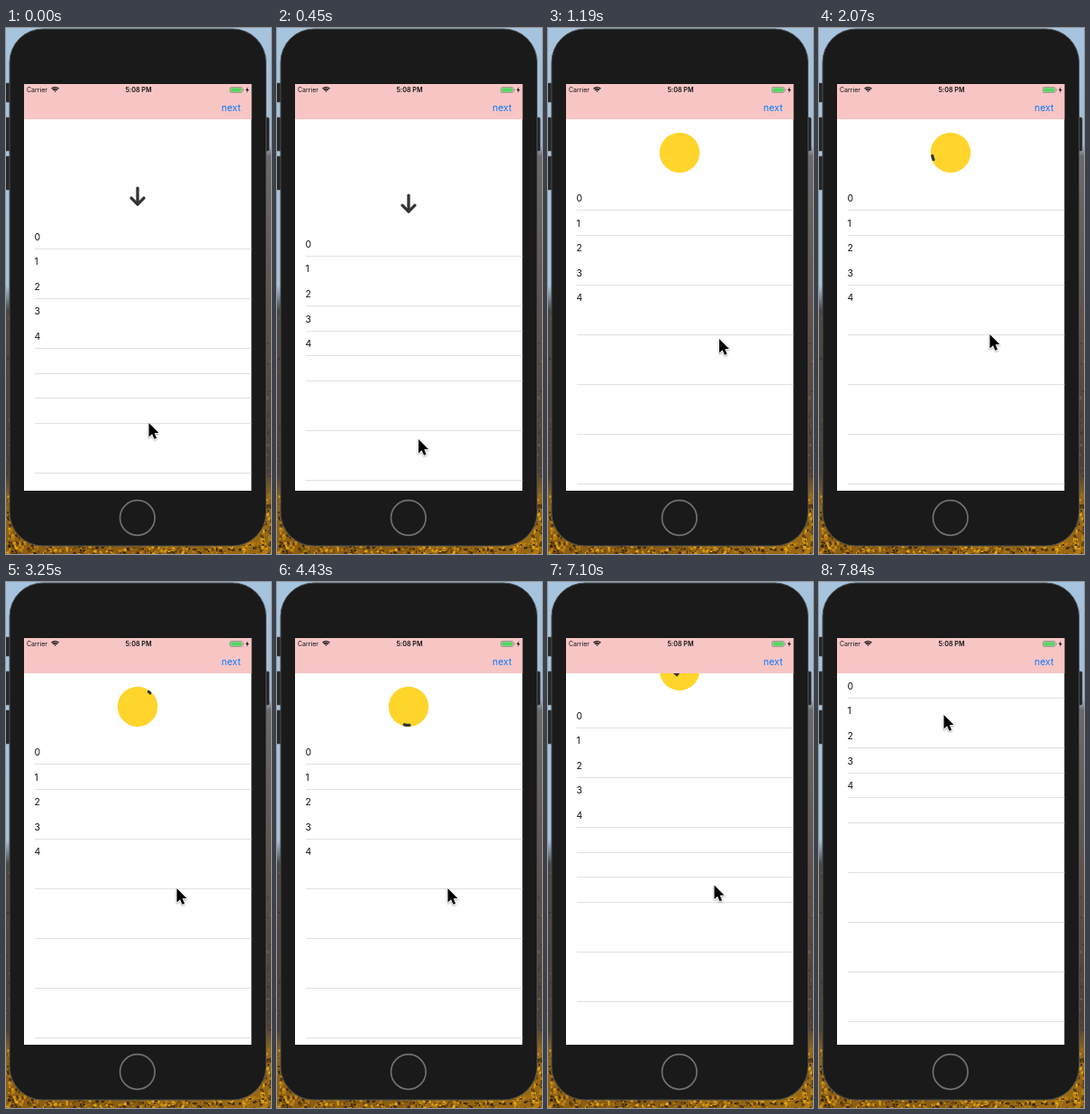
Animation of 294 by 582 pixels, one loop 7990 ms. Source, as an HTML page with a canvas:

```html
<!DOCTYPE html>
<html lang="en">
<head>
<meta charset="utf-8">
<title>Pull to refresh</title>
<style>
  html, body { margin: 0; width: 100%; height: 100%; overflow: hidden; background: #1b1b1b; }
  canvas { display: block; width: 294px; height: 582px; }
</style>
</head>
<body>
<canvas></canvas>
<script>
const W = 294, H = 582, LOOP = 7990, TAU = Math.PI * 2;
const SCREEN = { x: 20, y: 62, w: 252.5, h: 450 }, NAV_BOTTOM = 101;
const ROW = 27.54, LINE = 0.62;
const INK = '#333436', FONT = 'Inter, Roboto, sans-serif';

// Screen updates come every 150 ms, a few of them after 140 ms.
const SHORT = new Set([7, 10, 13, 18, 21, 24, 28, 32, 37, 43, 48]);
const starts = [0];
for (let i = 0; i < 53; i++) starts.push(starts[i] + (SHORT.has(i) ? 140 : 150));

// [time, y of the first separator]
const SCROLL = [[0, 244.22], [600, 255], [750, 228.3], [900, 208], [1040, 202.4], [1190, 201.46],
  [6950, 201.46], [7100, 161.22], [7240, 139], [7390, 131], [7540, 128.3]];
// [time, x, y]
const POINTER = [[0, 158.5, 437], [600, 156.5, 461], [750, 156.5, 461], [1190, 190, 344],
  [1340, 189.5, 339], [6950, 189.5, 339], [7100, 184.5, 335.5], [7390, 165, 260],
  [7690, 140, 158], [7840, 138.5, 147]];

const canvas = document.querySelector('canvas');
const scale = window.devicePixelRatio || 1;
canvas.width = W * scale;
canvas.height = H * scale;
const backdrop = document.createElement('canvas');
backdrop.width = canvas.width;
backdrop.height = canvas.height;
let c;

function at(keys, t) {
  const i = keys.findIndex(k => k[0] > t);
  if (i < 0) return keys[keys.length - 1].slice(1);
  const a = keys[i - 1], b = keys[i], p = (t - a[0]) / (b[0] - a[0]);
  return a.slice(1).map((v, n) => v + (b[n + 1] - v) * p);
}

function rect(x, y, w, h, fill) {
  c.fillStyle = fill;
  c.fillRect(x, y, w, h);
}

function rounded(x, y, w, h, r, fill, stroke, width = 1) {
  c.beginPath();
  c.roundRect(x, y, w, h, r);
  if (fill) { c.fillStyle = fill; c.fill(); }
  if (stroke) { c.strokeStyle = stroke; c.lineWidth = width; c.stroke(); }
}

function line(points, color, width) {
  c.beginPath();
  points.forEach(p => c.lineTo(...p));
  c.strokeStyle = color;
  c.lineWidth = width;
  c.lineCap = c.lineJoin = 'round';
  c.stroke();
}

function label(text, x, y, size, color = '#111', weight = 400, align = 'left') {
  c.font = `${weight} ${size}px ${FONT}`;
  c.textAlign = align;
  c.fillStyle = color;
  c.fillText(text, x, y);
}

function gradient(stops) {
  const g = c.createLinearGradient(0, 0, 0, H);
  stops.forEach(([y, color]) => g.addColorStop(y / H, color));
  return g;
}

function drawWallpaper() {
  let seed = 7;
  const rnd = () => (seed = seed * 16807 % 2147483647) / 2147483647;
  rect(0, 0, 150, H, gradient([[0, '#a6c4de'], [285, '#a9c3d8'], [300, '#77828c'], [312, '#4b4845'],
    [495, '#4a4038'], [520, '#8a6420'], [582, '#8c5d12']]));
  rect(150, 0, 144, H, gradient([[0, '#a6c4de'], [130, '#a3bcd2'], [142, '#6d6a6c'], [330, '#5d514b'],
    [490, '#4b4038'], [520, '#94691c'], [582, '#996812']]));
  const speckle = (count, top, height, colors, size) => {
    for (let i = 0; i < count; i++) {
      const side = rnd() < 0.5 ? rnd() * 14 : W - rnd() * 14;
      const x = top > 560 ? rnd() * W : side;
      rect(x, top + rnd() * height, size * rnd() + 0.7, size * rnd() + 0.7, colors[i % colors.length]);
    }
  };
  speckle(150, 310, 200, ['#39332f', '#6b5c52', '#57493f'], 3);
  speckle(200, 515, 67, ['#dba018', '#5a3c0c', '#b97d12', '#35260e'], 3);
  speckle(420, 568, 14, ['#e0a416', '#6b470c', '#c4860f', '#3b2a0c'], 3);
}

function drawStatus() {
  rect(SCREEN.x, SCREEN.y, SCREEN.w, NAV_BOTTOM - SCREEN.y, '#f8c5c5');
  label('Carrier', 23, 71, 7);
  label('5:08 PM', 147, 71, 7.2, '#111', 600, 'center');
  label('next', 260.3, 91.5, 10.4, '#0a7aff', 400, 'right');
  c.strokeStyle = '#111';
  c.lineCap = 'butt';
  c.lineWidth = 1.4;
  [1, 3.3, 5.4].forEach(r => {
    c.beginPath();
    c.arc(54.5, 71, r, -Math.PI * 0.76, -Math.PI * 0.24);
    c.stroke();
  });
  rounded(248.5, 65.5, 13.5, 6, 1.3, null, '#777', 0.6);
  rounded(249.3, 66.2, 12, 4.6, 0.7, '#55d663');
  rect(262.8, 67.5, 0.8, 2, '#777');
  c.beginPath();
  [[268.4, 65.3], [265.8, 69], [267.5, 69], [266.9, 71.8], [269.6, 67.9], [267.9, 67.9]]
    .forEach(p => c.lineTo(...p));
  c.fillStyle = '#111';
  c.fill();
}

function drawPhone() {
  [[0, 61, 21], [0, 99, 37], [0, 142, 37], [286, 99, 37]]
    .forEach(([x, y, h]) => rounded(x - 1, y, 7, h, 1.5, '#25272a', '#44474a', 0.6));
  rounded(4, 1, 284.5, 572, 37, '#1a1a1a', '#4b4e51', 1);
  c.beginPath();
  c.arc(145.8, 542, 19.3, 0, TAU);
  c.strokeStyle = '#707070';
  c.lineWidth = 1.7;
  c.stroke();
  drawStatus();
}

function drawArrow(top, size) {
  c.save();
  c.translate(146, top - 30.6);
  c.scale(size, size);
  line([[0, -9], [0, 8.7]], INK, 3.3);
  line([[-7, 2], [0, 9], [7, 2]], INK, 3.3);
  c.restore();
}

function drawSpinner(top, t) {
  const x = 146, y = top - 36;
  c.beginPath();
  c.arc(x, y, 22.2, 0, TAU);
  c.fillStyle = '#ffd42b';
  c.fill();
  if (t >= 1340 && t < 5900) {
    const angle = (164 + (t - 2070) * 360 / 840) * Math.PI / 180;
    const half = 0.04 + 0.05 * (1 + Math.cos(angle - 1.66));
    c.beginPath();
    c.arc(x, y, 20.5, angle - half, angle + half);
    c.strokeStyle = INK;
    c.lineWidth = 3.2;
    c.lineCap = 'round';
    c.stroke();
  }
  if (t > 6100) drawCheck(x, y, Math.min(1, (t - 6060) / 590));
}

function drawCheck(x, y, progress) {
  const [a, b, d] = [[-15.5, -6.5], [-3, 5], [12, -17.5]].map(p => [x + p[0], y + p[1]]);
  const mix = (p, q, k) => p.map((v, i) => v + (q[i] - v) * k);
  const bend = 0.38;
  const path = progress < bend
    ? [a, mix(a, b, progress / bend)]
    : [a, b, mix(b, d, (progress - bend) / (1 - bend))];
  line(path, INK, 3.2);
}

// Separators are thinner than a pixel: only those that cross a pixel centre show.
function drawRows(first) {
  for (let k = 0; k < 14; k++) {
    const y = first + k * ROW, px = Math.ceil(y - 0.5);
    if (px + 0.5 < y + LINE) rect(32, px, 240.5, 1, '#e1e1e3');
    if (k < 5) label(k, 31.6, Math.round(y - 9.4), 10.4);
  }
}

function drawPointer(x, y) {
  c.save();
  c.translate(x, y);
  c.beginPath();
  [[0, 0], [0, 15.6], [3.6, 12.3], [6, 17.8], [8.6, 16.7], [6.2, 11.3], [11, 11.1]]
    .forEach(p => c.lineTo(...p));
  c.closePath();
  c.shadowColor = 'rgba(0,0,0,.35)';
  c.shadowBlur = 2 * scale;
  c.shadowOffsetY = scale;
  c.strokeStyle = '#fff';
  c.lineWidth = 1.6;
  c.lineJoin = 'round';
  c.stroke();
  c.shadowColor = 'transparent';
  c.fillStyle = '#000';
  c.fill();
  c.restore();
}

function draw(t) {
  c.drawImage(backdrop, 0, 0, W, H);
  const [first] = at(SCROLL, t), top = first - ROW;
  c.save();
  c.beginPath();
  c.rect(SCREEN.x, NAV_BOTTOM, SCREEN.w, SCREEN.y + SCREEN.h - NAV_BOTTOM);
  c.clip();
  rect(SCREEN.x, NAV_BOTTOM, SCREEN.w, SCREEN.h, '#fff');
  if (t < 1000) drawArrow(top, t < 850 ? 1 : 0.5);
  else drawSpinner(top, t);
  drawRows(first);
  c.restore();
  drawPointer(...at(POINTER, t));
}

c = backdrop.getContext('2d');
c.scale(scale, scale);
drawWallpaper();
drawPhone();
c = canvas.getContext('2d');
c.scale(scale, scale);

const begin = performance.now();
let shown = -1;
function tick() {
  const t = (performance.now() - begin) % LOOP;
  const step = starts.findLastIndex(s => s <= t);
  if (step !== shown) draw(starts[shown = step]);
  requestAnimationFrame(tick);
}
tick();
</script>
</body>
</html>
```
